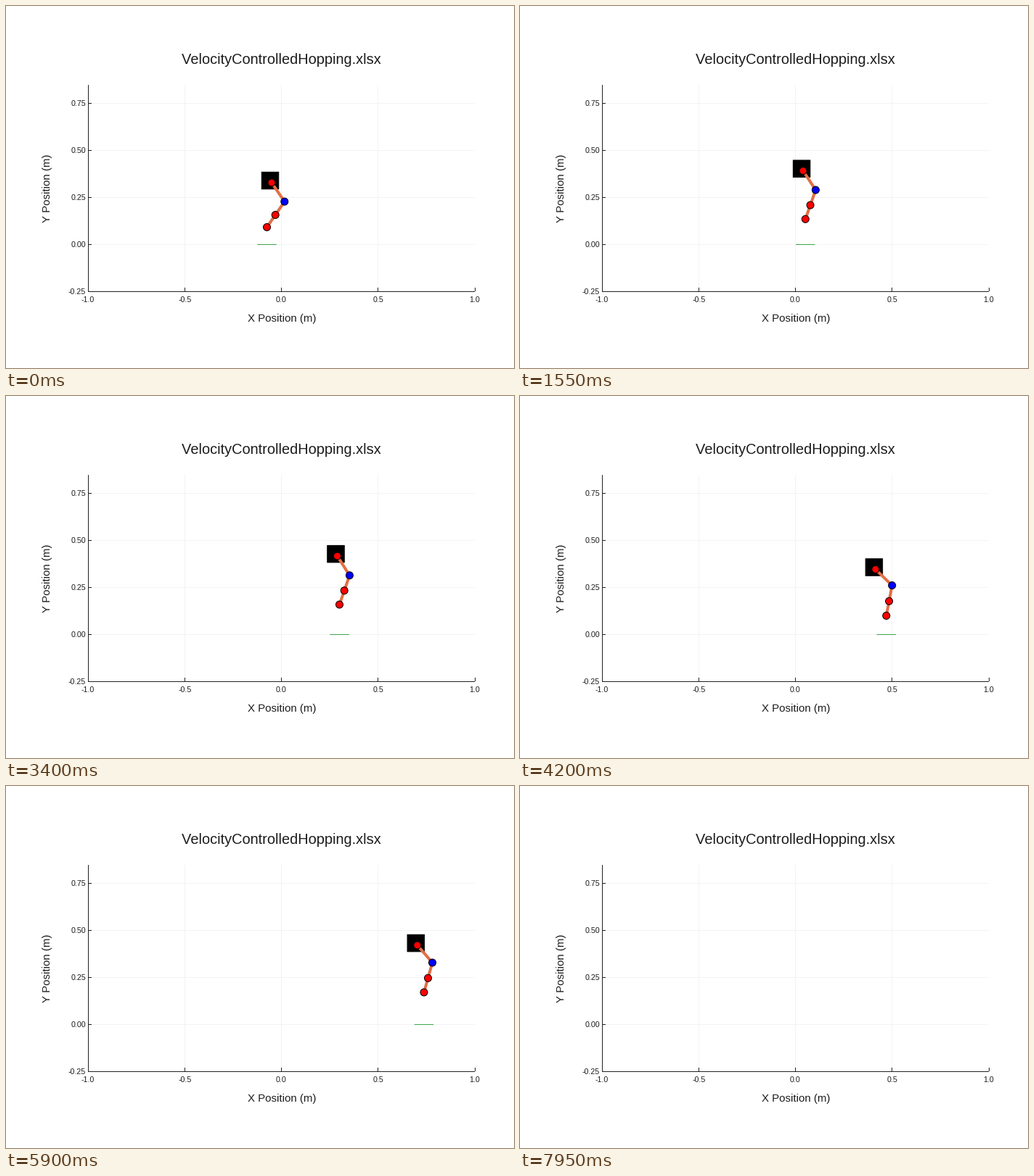
These frames come from a looping animation (700 px wide and 500 px high, 8000 ms). A matplotlib script:

```python
import numpy as np
import matplotlib.pyplot as plt
from matplotlib.animation import FuncAnimation
from matplotlib.patches import Circle, Rectangle

W, H, DPI = 700, 500, 100
FRAMES, STEP = 160, 50
PT = 72 / DPI                               # points per pixel
LEFT, RIGHT, TOP, BOTTOM = 113, 646, 109, 394
SX, SY = 266.5, 259.3                       # pixels per metre
GROUND = 329
THIGH, SHIN, MID = 0.121, 0.164, 0.52       # metres, metres, fraction of shin
HALF_G = 51                                 # px / s^2
LAND_Y, LIFT_Y = 266, 261                   # hip height at touchdown and lift-off
BODY = 23.5

plt.rcParams["font.family"] = "Liberation Sans"
plt.rcParams["text.kerning_factor"] = 6     # no pair kerning


def hermite(u, h, a, b, ma, mb):
    return ((1 + 2 * u) * (1 - u) ** 2 * a + u * (1 - u) ** 2 * h * ma
            + u * u * (3 - 2 * u) * b + u * u * (u - 1) * h * mb)


def smooth(keys):
    """Monotone cubic curve through (time, value) pairs."""
    t, v = np.array(keys, float).T
    h, d = np.diff(t), np.diff(v) / np.diff(t)
    m = np.concatenate([[d[0]], np.zeros(len(t) - 2), [d[-1]]])
    for i in range(1, len(t) - 1):
        if d[i - 1] * d[i] > 0:
            m[i] = 2 * d[i - 1] * d[i] / (d[i - 1] + d[i])

    def curve(x):
        i = int(np.clip(np.searchsorted(t, x, "right") - 1, 0, len(h) - 1))
        return hermite((x - t[i]) / h[i], h[i], v[i], v[i + 1], m[i], m[i + 1])
    return curve


# Hops: time and hip height of every apex
APEX = [(0, 244), (1.661, 227), (3.575, 219.5), (5.622, 216), (7.745, 214)]
LAND = [t + np.sqrt((LAND_Y - y) / HALF_G) for t, y in APEX[:-1]]
LIFT = [t - np.sqrt((LIFT_Y - y) / HALF_G) for t, y in APEX[1:]]

hip_x = smooth([(0, 366), (0.66, 365.5), (0.85, 366.9), (0.9, 368.7),
                (1.7, 395), (2.25, 413.3), (3.4, 456.5), (4.25, 492),
                (4.95, 521.5), (5.1, 529), (5.95, 569), (6.8, 604),
                (7.65, 647), (7.95, 662.2), (8, 664.7)])


def hip_y(t):
    for n, (land, lift) in enumerate(zip(LAND, LIFT)):
        if land < t < lift:
            fall = 2 * HALF_G * (land - APEX[n][0])
            rise = 2 * HALF_G * (lift - APEX[n + 1][0])
            return hermite((t - land) / (lift - land), lift - land,
                           LAND_Y, LIFT_Y, fall, rise)
    at, ay = APEX[sum(t >= lift for lift in LIFT)]
    return ay + HALF_G * (t - at) ** 2


def leg_keys():
    """Foot offset from the hip over the gait: (time, dx, dy)."""
    keys = [(0, -6.5, 61.5)]
    for n, (land, lift) in enumerate(zip(LAND, LIFT)):
        if n:
            keys.append((land - 0.28, 15, 64))
        keys += [(land, 8 if n else -8, 64.5),
                 (land + 0.04, -14, 65.5),
                 (lift - 0.045, 37, 63.5),
                 (lift, 13, 69),
                 (lift + 0.055, 10, 68.5),
                 (lift + 0.265, 4, 69),
                 (APEX[n + 1][0] - 0.17, 3, 67)]
    return keys + [(8.2, 8, 66)]


foot_dx = smooth([(t, x) for t, x, _ in leg_keys()])
foot_dy = smooth([(t, y) for t, _, y in leg_keys()])


def pose(t):
    scale = np.array([SX, SY])
    hip = np.array([hip_x(t), hip_y(t)])
    reach = np.array([foot_dx(t), foot_dy(t)])
    leg = reach / scale
    d = min(np.hypot(*leg), THIGH + SHIN)
    ux, uy = leg / np.hypot(*leg)
    a = (d * d + THIGH ** 2 - SHIN ** 2) / (2 * d)
    b = np.sqrt(max(THIGH ** 2 - a * a, 0))
    knee = hip + np.array([a * ux + b * uy, a * uy - b * ux]) * scale
    foot = hip + reach
    return hip, knee, knee + MID * (foot - knee), foot


fig = plt.figure(figsize=(W / DPI, H / DPI), dpi=DPI, facecolor="white")
ax = fig.add_axes([0, 0, 1, 1])
ax.set_xlim(0, W)
ax.set_ylim(H, 0)
ax.axis("off")
clip = Rectangle((LEFT, TOP), RIGHT - LEFT + 0.8, BOTTOM - TOP + 1,
                 transform=ax.transData)


def line(x, y, color, width=1, z=1):
    return ax.plot(x, y, color=color, lw=width * PT, zorder=z, snap=False,
                   solid_capstyle="butt", solid_joinstyle="round")[0]


def hline(x0, x1, y, color, z=1):
    return line([x0, x1], [y + 0.5, y + 0.5], color, z=z)


def vline(x, y0, y1, color, z=1):
    return line([x + 0.5, x + 0.5], [y0, y1], color, z=z)


def text(x, y, s, px, ha="center", **kw):
    ax.text(x, y, s, fontsize=px * PT, ha=ha, va="baseline", color="#1c1c1c", **kw)


def clipped(artist):
    artist.set_clip_path(clip)
    return artist


def shape(patch, fill, z):
    patch.set(facecolor=fill, edgecolor="black", linewidth=PT, zorder=z,
              snap=False, joinstyle="round")
    return clipped(ax.add_patch(patch))


# Grid, axes and labels
INK, GRID = "#222222", "#f3f3f3"
for k in range(5):
    mid = LEFT + k * (RIGHT - LEFT) / 4
    x = int(mid)
    if 0 < k < 4:
        vline(x, TOP, BOTTOM, GRID)
    vline(x, BOTTOM - 5, BOTTOM, INK, 2)
    text(mid, 409, f"{-1 + k / 2:.1f}", 10.67)
for k in range(5):
    y = int(BOTTOM - 64.9 * k)
    if k:
        hline(LEFT, RIGHT, y, GRID)
    hline(LEFT, LEFT + 5, y, INK, 2)
    text(110, y + 4.3, f"{-0.25 + k / 4:.2f}", 10.67, "right")
vline(LEFT, TOP, BOTTOM + 1, INK, 2)
hline(LEFT, RIGHT, BOTTOM, INK, 2)
text(379.5, 80.3, "VelocityControlledHopping.xlsx", 20)
text(380, 435.7, "X Position (m)", 15)
text(60.5, 251.3, "Y Position (m)", 15, rotation=90, rotation_mode="anchor")

# Robot
floor = clipped(hline(0, 0, GROUND, "#3da44d", 3))
body = shape(Rectangle((0, 0), BODY, BODY), "black", 4)
limb = clipped(line([], [], "#e26f46", 4, 5))
dots = [shape(Circle((0, 0), 5), c, 6) for c in ("red", "blue", "red", "red")]


def draw(i):
    joints = pose(i * STEP / 1000)
    hip, foot = joints[0], joints[-1]
    floor.set_xdata([foot[0] - 13.3, foot[0] + 13.3])
    body.set_xy((hip[0] - 2 - BODY / 2, hip[1] - 2.9 - BODY / 2))
    limb.set_data(*np.array(joints).T)
    for mark, p in zip(dots, joints):
        mark.center = tuple(p)
    return [floor, body, limb, *dots]


anim = FuncAnimation(fig, draw, frames=FRAMES, interval=STEP, repeat=True,
                     repeat_delay=0, blit=False)
plt.show()
```
